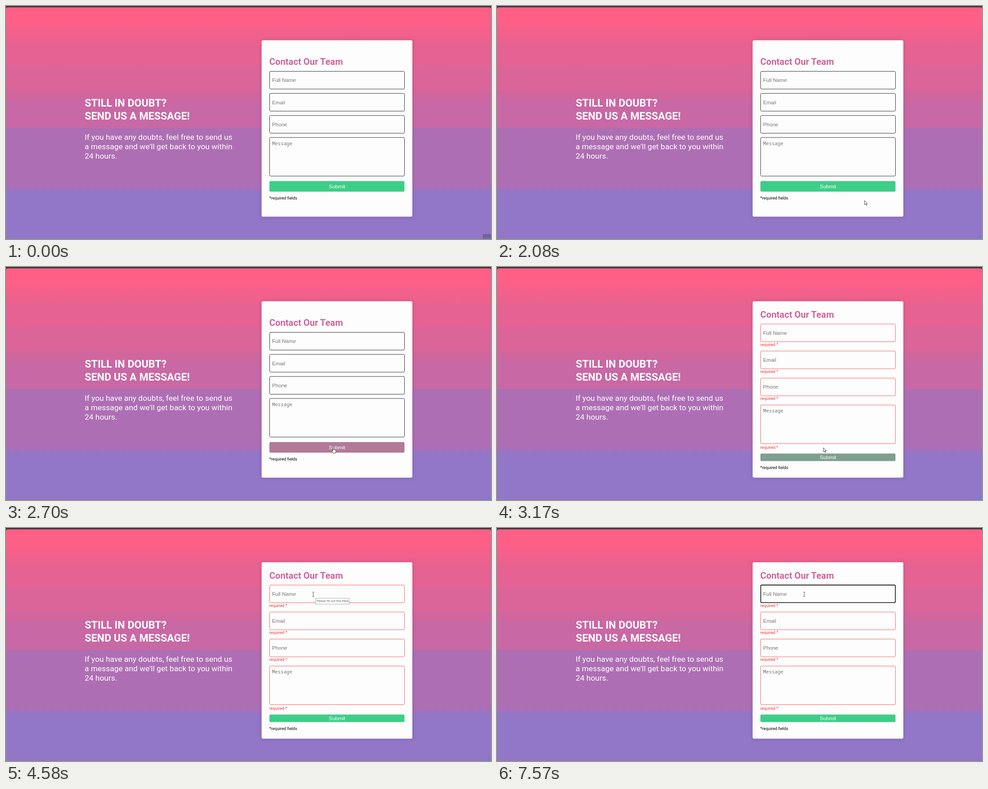
An HTML page that plays this animation: 1079 by 519 pixels, repeating every 8 s.

```html
<!DOCTYPE html>
<html lang="en">
<head>
<meta charset="utf-8">
<title>Contact form</title>
<style>
html, body { margin: 0; width: 100%; height: 100%; overflow: hidden; background: #3b393e; }
svg { display: block; font-family: Roboto, sans-serif; }
.field { fill: #fdfdfd; stroke: #333; }
.bad .field { stroke: #f66464; }
.hint { font: 11.6px "Liberation Sans", Arial, sans-serif; fill: #757575; }
.mono { font: 10.7px "Noto Sans Mono", monospace; fill: #757575; }
.submit { font: 11.7px "Liberation Sans", Arial, sans-serif; fill: #fff; text-anchor: middle; }
.title { font-size: 20.2px; font-weight: 700; fill: #cf649b; }
.small { font-size: 9.2px; }
.error { font-size: 9.2px; fill: #f23535; }
.lead { font-size: 23.2px; font-weight: 700; fill: #fff; }
.copy { font-size: 17.4px; fill: #fff; }
.tip { font: 6.75px "Open Sans", sans-serif; fill: #575757; }
#card { filter: drop-shadow(0 0 5px rgba(0,0,0,.14)); }
</style>
</head>
<body>
<svg width="1079" height="519" viewBox="0 0 1079 519">
  <defs>
    <linearGradient id="sky" gradientUnits="userSpaceOnUse" x1="0" y1="0" x2="0" y2="519"></linearGradient>
  </defs>
  <rect width="1079" height="519" fill="#3b393e"/>
  <rect y="3" width="1079" height="530" rx="4" fill="url(#sky)"/>
  <g id="status">
    <rect x="1061" y="508" width="22" height="15" rx="1.5" fill="#6f639d"/>
    <text x="1064" y="520" font-size="8" fill="#9082ba">Gre</text>
  </g>
  <path id="corner" d="M1079 508V519H1061Z" fill="#8079d3" opacity=".7"/>
  <text class="lead" x="175.3" y="224">STILL IN DOUBT?</text>
  <text class="lead" x="175.3" y="253">SEND US A MESSAGE!</text>
  <text class="copy" x="175" y="298">If you have any doubts, feel free to send us</text>
  <text class="copy" x="175" y="319">a message and we'll get back to you within</text>
  <text class="copy" x="175" y="340">24 hours.</text>
  <rect id="card" x="568.7" y="76.3" width="335.3" height="392.9" rx="3.5" fill="#fdfdfd"/>
  <g id="clean"></g>
  <g id="invalid" class="bad"></g>
  <g id="focus">
    <rect x="586.75" y="127.1" width="299.5" height="39.2" rx="2.5" fill="none" stroke="#111" stroke-width="1.6"/>
    <rect id="caret" x="592" y="140" width="1" height="13" fill="#222"/>
  </g>
  <g id="tip">
    <rect x="688.5" y="156.5" width="75" height="13" fill="#fff" stroke="#8a8a8a" stroke-width=".7"/>
    <text class="tip" x="691" y="165.3">Please fill out this field.</text>
  </g>
  <g id="cursor" stroke-linejoin="round">
    <path id="arrow" d="M.4.4V9.6L2.5 7.7 4.1 11 5.5 10.4 4 7.2H6.8Z" fill="#fff" stroke="#222" stroke-width=".8"/>
    <path id="hand" d="M-1 7.5V.8Q0-1 1 .8V4.4L4.6 5.2Q5.7 5.6 5.6 7.5L5.2 9.8 4.4 12.4H-.6L-3.2 8.2Q-3.4 6.6-2 6.6Z" fill="#fff" stroke="#222" stroke-width=".8"/>
    <path id="beam" d="M-2.3-5H-.6L0-4.5.6-5H2.3M0-4.5V4.5M-2.3 5H-.6L0 4.5.6 5H2.3" fill="none" stroke="#4a4a4a" stroke-width=".9"/>
  </g>
</svg>
<script>
const LOOP = 8000, INVALID = 3000, FOCUS = 4910, BLINK = 530;
const $ = id => document.getElementById(id);

// background bands: y, colour
$("sky").innerHTML = [
  [3, "#fe5f86"], [40, "#fe5f86"], [46, "#f66089"], [78, "#ec618e"], [84, "#e66292"],
  [131, "#e66292"], [133, "#db6599"], [186, "#db6599"], [188, "#d1669e"], [207, "#d1669e"],
  [209, "#c868a4"], [271.5, "#c868a4"], [272.5, "#ae6eb4"], [400, "#ae6eb4"],
  [408, "#a072be"], [416, "#9276c8"], [519, "#9276c8"]
].map(([y, c]) => `<stop offset="${y / 519}" stop-color="${c}"/>`).join("");

const layouts = {
  clean: { title: 131.2, tops: [145, 194.2, 243.4, 292.4], button: [390, 23.6], note: 431 },
  invalid: { title: 112.7, tops: [126.5, 186.7, 246.9, 307], button: [415.5, 16.8], note: 449.7 }
};
const labels = ["Full Name", "Email", "Phone", "Message"];
const heightOf = i => i < 3 ? 40.5 : 87;

const text = (cls, x, y, s) => `<text class="${cls}" x="${x}" y="${y}">${s}</text>`;

function buildForm(id) {
  const { title, tops, button: [by, bh], note } = layouts[id];
  let out = text("title", 585.8, title, "Contact Our Team");
  labels.forEach((label, i) => {
    const y = tops[i], h = heightOf(i);
    out += `<rect class="field" x="586.5" y="${y + .5}" width="300" height="${h - 1}" rx="2.5"/>`;
    out += text(i < 3 ? "hint" : "mono", 592, y + (i < 3 ? 24.3 : 17.2), label);
    if (id === "invalid") out += text("error", 585.8, y + h + (i < 3 ? 9 : 11), "required *");
  });
  out += `<rect class="button" x="586" y="${by}" width="300.5" height="${bh}" rx="2.5"/>`;
  out += text("submit", 736.3, by + bh / 2 + 4, "Submit");
  out += text("small", 585.8, note, "*required fields");
  $(id).innerHTML = out;
}
Object.keys(layouts).forEach(buildForm);
const buttons = document.querySelectorAll(".button");

// pointer path: time, x, y
const path = [
  [530, 1004, 511], [870, 872, 441], [1270, 872, 441], [1340, 876, 443], [1750, 819, 433],
  [2010, 819, 433], [2080, 817.5, 433], [2450, 752, 412], [2700, 728.5, 402.3],
  [2990, 728.5, 402.3], [3090, 725.8, 402.3], [3420, 725.8, 402.3], [3650, 711.7, 200.8],
  [4240, 683.5, 147.8], [LOOP, 683.5, 147.8]
];

function pointerAt(t) {
  const i = Math.max(1, path.findIndex(p => p[0] > t));
  const [t0, x0, y0] = path[i - 1], [t1, x1, y1] = path[i];
  const p = Math.max(0, (t - t0) / (t1 - t0));
  return [x0 + (x1 - x0) * p, y0 + (y1 - y0) * p];
}

function pointerKind(y, { tops, button: [by, bh] }) {
  if (y >= by && y <= by + bh) return "hand";
  return tops.some((top, i) => y >= top && y <= top + heightOf(i)) ? "beam" : "arrow";
}

const ease = p => 1 - (1 - Math.min(1, Math.max(0, p))) ** 2.4;
const show = (id, on) => $(id).style.display = on ? "" : "none";

function draw(t) {
  const state = t < INVALID ? "clean" : "invalid";
  for (const id in layouts) show(id, id === state);
  show("status", t < 70);
  show("corner", t >= 70);

  const hover = t < 3030 ? ease((t - 2455) / 500) : 1 - ease((t - 3030) / 500);
  const mix = [[61, 205], [206, 101], [136, 155]].map(([a, b]) => Math.round(a + (b - a) * hover));
  buttons.forEach(b => b.setAttribute("fill", `rgb(${mix})`));

  const [x, y] = pointerAt(t);
  show("cursor", t >= 530);
  $("cursor").setAttribute("transform", `translate(${x} ${y})`);
  const kind = t > 1800 ? pointerKind(y, layouts[state]) : "arrow";
  for (const id of ["arrow", "hand", "beam"]) show(id, id === kind);

  show("tip", t >= 4580 && t < FOCUS);
  show("focus", t >= FOCUS);
  show("caret", Math.floor((t - FOCUS - 10) / BLINK) % 2 === 0);
}

const start = performance.now();
function tick() {
  draw((performance.now() - start) % LOOP);
  requestAnimationFrame(tick);
}
tick();
</script>
</body>
</html>
```
